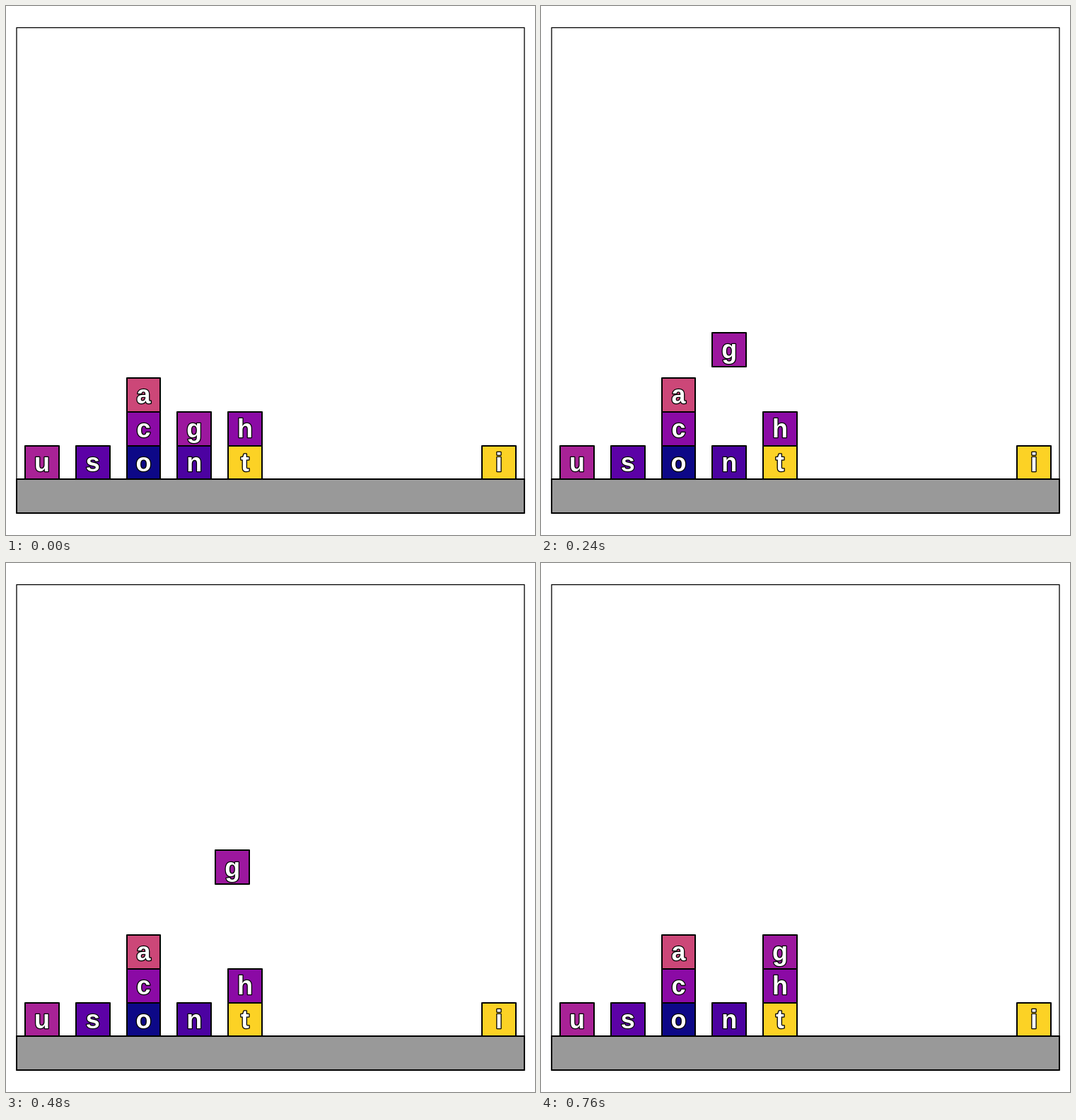
An HTML page with a canvas that plays this animation: 748 by 748 pixels, repeating every 0.8 s.

```html
<!DOCTYPE html>
<html>
<head>
<meta charset="utf-8">
<title>Blocks</title>
<style>
  html, body { margin: 0; width: 100%; height: 100%; overflow: hidden; background: #fff; }
  canvas { display: block; }
</style>
</head>
<body>
<canvas id="stage" width="748" height="748"></canvas>
<script>
const ctx = document.getElementById('stage').getContext('2d');
const UNIT = 718 / 15, LEFT = 15, FLOOR = 669.4;
const STEP = 40, STEPS = 20;

// letter, colour, column, level
const blocks = [
  ['u', '#a82296', 0, 0],
  ['s', '#5c01a6', 1, 0],
  ['o', '#0d0887', 2, 0],
  ['c', '#8b0aa5', 2, 1],
  ['a', '#cc4778', 2, 2],
  ['n', '#4c02a1', 3, 0],
  ['t', '#fcd225', 4, 0],
  ['h', '#8b0aa5', 4, 1],
  ['i', '#fcd225', 9, 0],
];

function box(x0, y0, x1, y1, fill) {
  const x = Math.round(x0), y = Math.round(y0);
  const w = Math.round(x1) - x, h = Math.round(y1) - y;
  ctx.fillStyle = fill;
  ctx.fillRect(x, y, w, h);
  ctx.lineWidth = 2;
  ctx.strokeRect(x, y, w, h);
}

function block(letter, colour, column, level) {
  const x = LEFT + (0.25 + 1.5 * column) * UNIT;
  const y = FLOOR - (level + 1) * UNIT;
  box(x, y, x + UNIT, y + UNIT, colour);
  const textX = x + UNIT / 2, textY = y + 36.4;
  ctx.lineWidth = 2.6;
  ctx.strokeText(letter, textX, textY);
  ctx.fillStyle = '#fff';
  ctx.fillText(letter, textX, textY);
}

const progress = (step, from, to) => Math.min(1, Math.max(0, (step - from) / (to - from)));

function draw(now) {
  const step = Math.floor(now / STEP) % STEPS;
  ctx.fillStyle = '#fff';
  ctx.fillRect(0, 0, 748, 748);
  ctx.strokeStyle = '#000';
  ctx.lineJoin = 'round';
  ctx.font = 'bold 36px "Liberation Sans", Arial, sans-serif';
  ctx.textAlign = 'center';

  box(LEFT, FLOOR, 733, 717, '#999');
  for (const b of blocks) block(...b);

  // lift, carry one column right, lower
  const column = 3 + progress(step, 9, 13);
  const level = 1 + 3.5 * progress(step, 0, 9) - 2.5 * progress(step, 13, 19);
  block('g', '#9c179e', column, level);

  ctx.lineWidth = 1.3;
  ctx.strokeRect(LEFT, 30.6, 718, 686.4);
  requestAnimationFrame(draw);
}
requestAnimationFrame(draw);
</script>
</body>
</html>
```
